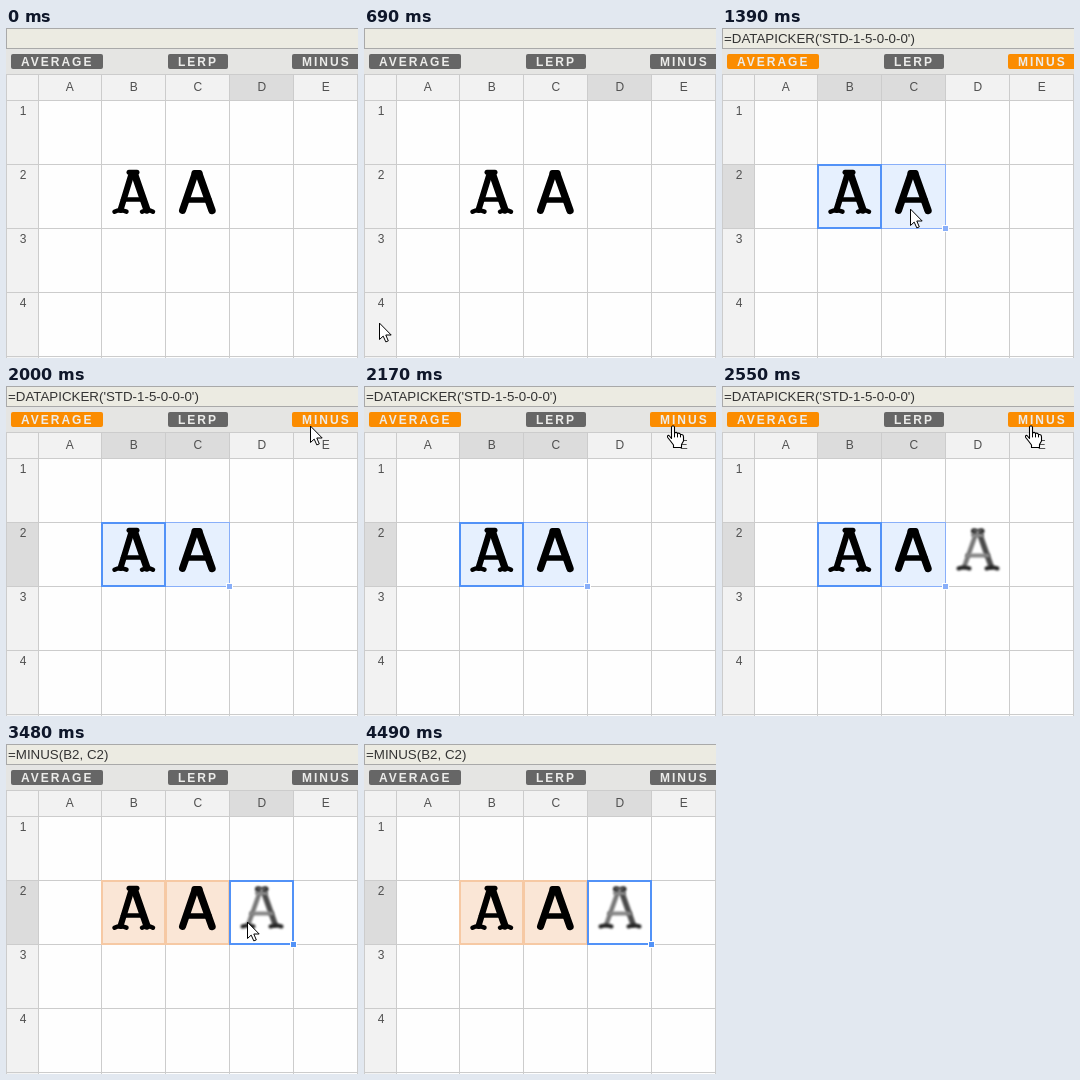
An HTML page with a canvas that plays this animation: 352 px wide and 330 px high, repeating every 5.05 s.

```html
<!DOCTYPE html>
<html lang="en">
<head>
<meta charset="utf-8">
<title>Letter spreadsheet</title>
<style>
html, body { margin: 0; width: 100%; height: 100%; overflow: hidden; background: #fefefe; }
canvas { display: block; }
</style>
</head>
<body>
<canvas id="stage" width="352" height="330"></canvas>
<script>
const ctx = document.getElementById('stage').getContext('2d');
const LOOP = 5050, CELL = 64;
const SANS = '"Liberation Sans", Arial, sans-serif';
const BLUE = '#5292f7', PALE_BLUE = '#89aff9';
const LINE = '#cccccc', HEAD = '#f2f2f2', ACTIVE = '#dcdcdc';

// Mouse moves: start time, end time, steps, then start, bend and end points.
const moves = [
  [690, 990, 5, [15, 295], [85, 112], [127, 182]],
  [1240, 1390, 3, [127, 182], [160, 184], [188, 181]],
  [1620, 2080, 7, [194, 173], [307.5, 14], [307, 45]],
  [3010, 3330, 5, [298, 55], [262, 130], [241, 178]],
  [4110, 4490, 6, [247, 188], [270, 250], [311, 338]]
];

const colX = c => 32 + c * CELL;   // left edge of column c (A = 0)
const rowY = r => 73 + r * CELL;   // top edge of row r (1 = 0)

function rect(x, y, w, h, color) {
  ctx.fillStyle = color;
  ctx.fillRect(x, y, w, h);
}

function frame(x, y, w, h, color, width) {
  ctx.strokeStyle = color;
  ctx.lineWidth = width;
  ctx.lineJoin = 'miter';
  ctx.strokeRect(x, y, w, h);
}

function text(str, x, y, font, color, align = 'left', spacing = 0) {
  ctx.font = font + ' ' + SANS;
  ctx.letterSpacing = spacing + 'px';
  ctx.textAlign = align;
  ctx.fillStyle = color;
  ctx.fillText(str, x, y);
}

function stroke(d, width, color) {
  ctx.strokeStyle = color;
  ctx.lineWidth = width;
  ctx.lineCap = ctx.lineJoin = 'round';
  ctx.stroke(new Path2D(d));
}

function button(label, x, w, lit) {
  ctx.fillStyle = lit ? '#fb8c00' : '#666666';
  ctx.beginPath();
  ctx.roundRect(x, 26, w, 15, 2);
  ctx.fill();
  text(label, x + 10, 38, 'bold 12px', '#ececea', 'left', 2);
}

// Letters are drawn relative to the top left corner of their cell.
function letter(col, blur, strokes) {
  ctx.save();
  ctx.translate(colX(col), 137);
  ctx.filter = `blur(${blur}px)`;
  for (const [d, width, color = '#000'] of strokes) stroke(d, width, color);
  ctx.restore();
}

const slabA = [
  ['M29.5 9 L18.5 45', 6], ['M32.5 9 L45 45', 7.2],
  ['M27 7.3 H35', 5], ['M21 34.5 H42', 4.5],
  ['M12.5 46.7 Q18 44 24.5 46.7', 4.5], ['M40 46.7 Q46 44 51 46.7', 4.5]
];
const sansA = [
  ['M29 9 L16.5 45.5', 7], ['M33 9 L46 45.5', 7.4],
  ['M28.5 8 H33.5', 6], ['M20 35 H43', 5.5]
];
const ghostA = [
  ['M29.5 12 L18.5 43', 4.5, '#777'], ['M34 12 L45 43', 5.5, '#4a4a4a'],
  ['M27 12 H36', 4, '#888'], ['M21 32.5 H42', 4, '#858585'],
  ['M27.5 8 H28.5', 5, '#222'], ['M35 8 H36', 5, '#222'], ['M28 7.5 H35', 3, '#555'],
  ['M12.5 45.5 Q18 43.5 23.5 45.5', 4, '#222'], ['M40.5 45.5 Q46 43.5 51.5 45.5', 4, '#222']
];

function handle(col, color) {
  const x = colX(col + 1) - 4;
  rect(x, 197, 7, 7, '#fff');
  rect(x + 1, 198, 5, 5, color);
}

function cursor(t) {
  const move = moves.findLast(m => t >= m[0]);
  if (!move) return;
  ctx.save();
  if (t >= 2170 && t < 3010) {
    ctx.translate(302, 39);
    ctx.fillStyle = '#fff';
    const hand = 'M5.5 13.5 V2 Q7 -.5 8.5 2 V8 Q10.5 6.5 11.5 8.5 Q13.5 7.5 14.5 9.5 ' +
      'Q17.5 9 17.5 12 V16 L15.5 19.5 V22.5 H7.5 V20 L4.5 16 L1.7 12.5 Q1 10 3 10.5 Z';
    ctx.fill(new Path2D(hand));
    stroke(hand, 1.1, '#000');
    stroke('M8.5 8 V12 M11.5 8.5 V12 M14.5 9.5 V12', 1, '#000');
  } else {
    const [start, end, steps, a, b, c] = move;
    // The pointer is sampled in even steps; the slack absorbs rounding.
    const step = Math.floor((t - start + 5) * (steps - 1) / (end - start));
    const u = Math.min(1, step / (steps - 1)), v = 1 - u;
    const at = i => Math.round(v * v * a[i] + 2 * u * v * b[i] + u * u * c[i]);
    ctx.translate(at(0) + .5, at(1) + .5);
    const arrow = 'M0 0 V16 L3.7 12.6 L6.3 18.4 L8.8 17.4 L6.3 11.5 H11.3 Z';
    ctx.fillStyle = '#fff';
    ctx.fill(new Path2D(arrow));
    stroke(arrow, 1, '#000');
  }
  ctx.restore();
}

function draw(now) {
  const t = now % LOOP;
  const one = t >= 1240 && t < 1310;
  const two = t >= 1310 && t < 3480;
  const result = t >= 3480;
  const activeCol = c => one ? c === 1 : two ? c === 1 || c === 2 : c === 3;

  // Formula bar and buttons
  rect(0, 0, 352, 330, '#fefefe');
  rect(0, 0, 352, 46, '#e5e5e3');
  rect(0, 0, 353, 21, '#a9a9a9');
  rect(1, 1, 352, 19, '#ecebe2');
  const formula = result ? '=MINUS(B2, C2)' : one || two ? "=DATAPICKER('STD-1-5-0-0-0')" : '';
  text(formula, 2, 15, '13.333px', '#333');
  button('AVERAGE', 5, 92, two);
  button('LERP', 162, 60, false);
  button('MINUS', 286, 69, two);

  // Headers and cell fills
  rect(0, 46, 352, 27, HEAD);
  rect(0, 73, 33, 257, HEAD);
  for (let c = 0; c < 5; c++) if (activeCol(c)) rect(colX(c), 46, CELL, 27, ACTIVE);
  if (t >= 1240) rect(0, 137, 33, CELL, ACTIVE);
  if (two || result) rect(96, 137, 127, 63, two ? '#e6f0fe' : '#fae6d6');
  if (t >= 2320) rect(224, 137, 63, 63, '#fff');

  // Grid lines and labels
  rect(0, 46, 352, 1, LINE);
  rect(0, 46, 1, 284, LINE);
  rect(32, 46, 1, 284, LINE);
  for (let i = 0; i < 5; i++) {
    rect(colX(i + 1) - 1, 46, 1, 284, LINE);
    rect(0, rowY(i) - 1, 352, 1, LINE);
    text('ABCDE'[i], colX(i) + 31.8, 63, '12px', '#505050', 'center');
    if (i < 4) text(String(i + 1), 17, rowY(i) + 14, '12px', '#505050', 'center');
  }

  letter(1, .6, slabA);
  letter(2, .7, sansA);
  if (t >= 2550) letter(3, 1, ghostA);

  // Selection
  if (two) frame(95.5, 136.5, 128, 64, PALE_BLUE, 1);
  if (one || two) frame(96, 137, 63, 63, BLUE, 2);
  if (one) handle(1, BLUE);
  if (two) handle(2, PALE_BLUE);
  if (result) {
    frame(96, 137, 63, 63, '#f6c9a4', 2);
    frame(160, 137, 63, 63, '#f6c9a4', 2);
    frame(224, 137, 63, 63, BLUE, 2);
    handle(3, BLUE);
  }

  cursor(t);
  requestAnimationFrame(draw);
}
requestAnimationFrame(draw);
</script>
</body>
</html>
```
